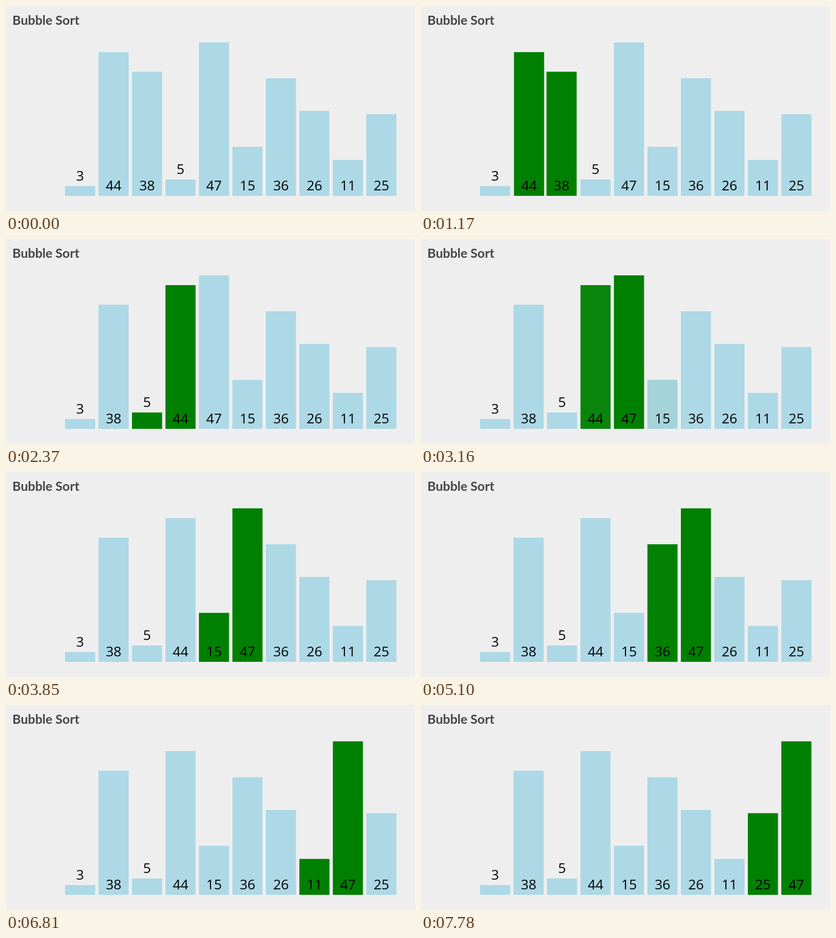
An HTML page with a canvas that plays this animation: 672 by 338 pixels, repeating every 8000 ms.

```html
<!DOCTYPE html>
<html lang="en">
<head>
<meta charset="utf-8">
<title>Bubble Sort</title>
<style>
  html, body { margin: 0; width: 100%; height: 100%; overflow: hidden; background: #eee; }
  canvas { display: block; }
</style>
</head>
<body>
<canvas id="stage" width="672" height="338"></canvas>
<script>
const ctx = document.getElementById('stage').getContext('2d');
const LOOP = 8000, FADE = 250;
const LEFT = 97, PITCH = 55, WIDTH = 49.5, BASE = 313, UNIT = 5.385;
const BLUE = [173, 216, 230], GREEN = [0, 128, 0];
const values = [3, 44, 38, 5, 47, 15, 36, 26, 11, 25];
const starts = [107, 617, 1133, 1622, 2107, 2592, 3102, 3587,
                4072, 4555, 5067, 5577, 6062, 6547, 7032, 7542];

// One bubble pass: each step changes the glow or the slot of some bars.
const steps = [];
const order = values.map((_, i) => i);
for (let i = 0; i < values.length - 1; i++) {
  const glow = [[order[i + 1], 1]];
  glow.push(i ? [order[i - 1], -1] : [order[0], 1]);
  steps.push({ key: 'glow', changes: glow });
  const [a, b] = [order[i], order[i + 1]];
  if (values[a] > values[b]) {
    steps.push({ key: 'slot', changes: [[a, 1], [b, -1]] });
    [order[i], order[i + 1]] = [b, a];
  }
}

function ease(p) {
  p = Math.min(1, Math.max(0, p));
  return p < 0.5 ? 4 * p ** 3 : 1 - 4 * (1 - p) ** 3;
}

function mix(glow) {
  return `rgb(${BLUE.map((c, i) => Math.round(c + (GREEN[i] - c) * glow))})`;
}

function barsAt(time) {
  const bars = values.map((value, slot) => ({ value, slot, glow: 0 }));
  steps.forEach(({ key, changes }, n) => {
    const p = ease((time - starts[n]) / FADE);
    for (const [bar, amount] of changes) bars[bar][key] += amount * p;
  });
  return bars;
}

function draw(time) {
  ctx.fillStyle = '#eee';
  ctx.fillRect(0, 0, 672, 338);

  ctx.fillStyle = '#444';
  ctx.textAlign = 'left';
  ctx.font = '700 21px Lato, sans-serif';
  ctx.fillText('Bubble Sort', 10.5, 31);

  const bars = barsAt(time);
  for (const { value, slot, glow } of bars) {
    ctx.fillStyle = mix(glow);
    ctx.fillRect(LEFT + slot * PITCH, BASE - value * UNIT, WIDTH, value * UNIT);
  }

  ctx.fillStyle = '#000';
  ctx.textAlign = 'center';
  ctx.font = '22.5px "Open Sans", "Noto Sans", sans-serif';
  for (const { value, slot } of bars) {
    const height = value * UNIT;
    const lift = height < 30 ? height : 0; // short bars carry their label on top
    ctx.fillText(value, LEFT + slot * PITCH + WIDTH / 2, BASE - 9 - lift);
  }
}

function tick() {
  draw(performance.now() % LOOP);
  requestAnimationFrame(tick);
}
tick();
</script>
</body>
</html>
```
